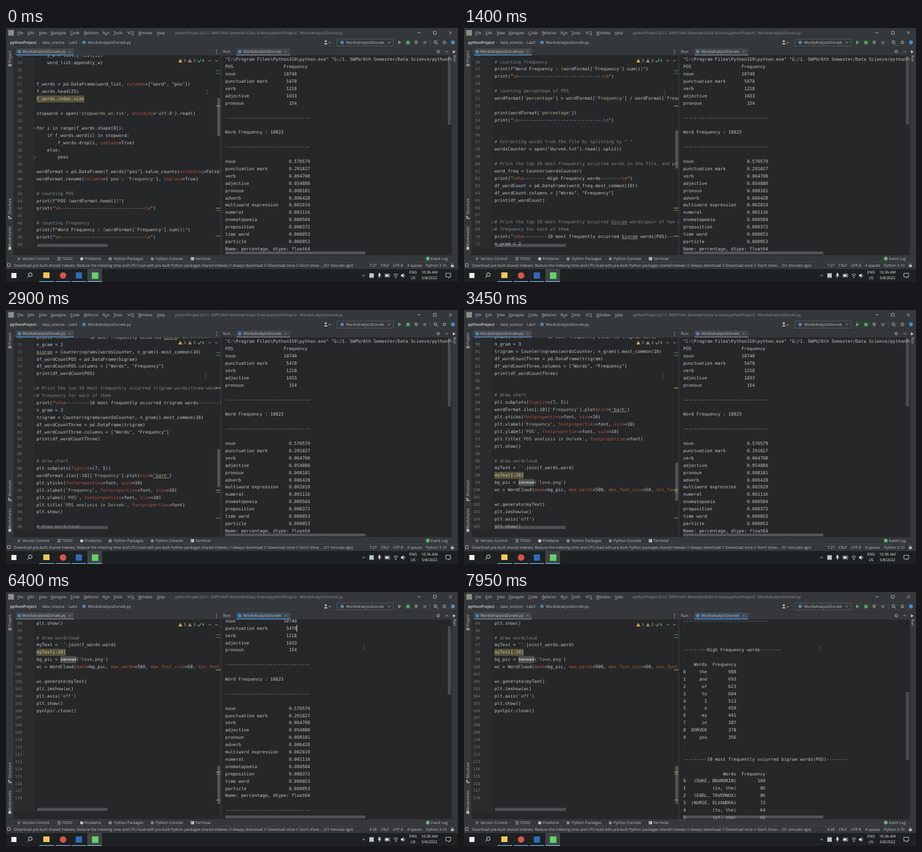
Animation of 800 by 450 pixels, one loop 8000 ms. Source, as an HTML page:

```html
<!DOCTYPE html>
<html lang="en">
<head>
<meta charset="utf-8">
<title>Code editor</title>
<style>
html, body { margin: 0; height: 100%; overflow: hidden; background: #252729; }
svg { display: block; width: 100vw; height: 100vh; }
text { font: 6.65px "Open Sans", "Noto Sans", sans-serif; white-space: pre; text-rendering: geometricPrecision; }
.mono text { font: 7.8px "DejaVu Sans Mono", "Noto Sans Mono", monospace; }
.mono .num { font-size: 7.1px; text-anchor: end; }
.bold { font-weight: 700; }
.esc { fill: #cc7832; }
.arg { fill: #b4533a; }
.str { fill: #aeb096; }
.typo { text-decoration: underline; text-decoration-color: #6f8f68; }
.old { text-decoration: line-through; }
.key { text-decoration: underline; }
</style>
</head>
<body>
<svg id="stage" viewBox="0 0 800 450" xml:space="preserve"></svg>
<script>
const ROW = 12.9, COL = 4.696, FIRST = 23, LAST = 118;
const EDITOR = '#252729', CHROME = '#35383a', INK = '#c2c4c6', DIM = '#85888a', GREEN = '#4fa55a';
const FOCUS = '#4a88c7', IDLE = '#747a80';
const FILE = 'WordsAnalysisDorvek';

const code = String.raw`    y_w = list(y_list[i])
    word_list.append(y_w)


f_words = pd.DataFrame(word_list, columns=["word", "pos"])
f_words.head(25)
f_words.index.size

stopword = open('stopwords_en.txt', encoding='utf-8').read()

for i in range(f_words.shape[0]):
    if f_words.word[i] in stopword:
        f_words.drop(i, inplace=True)
    else:
        pass

wordFormat = pd.DataFrame(f_words["pos"].value_counts(ascending=False))
wordFormat.rename(columns={'pos': 'Frequency'}, inplace=True)

# counting POS
print(f"POS {wordFormat.head()}")
print("\n--------------------------------\n")

# counting Frequency
print(f"Word Frequency : {wordFormat['Frequency'].sum()}")
print("\n--------------------------------\n")

# counting percentage of POS
wordFormat['percentage'] = wordFormat['Frequency'] / wordFormat['Frequency'].sum()

print(wordFormat['percentage'])
print("\n--------------------------------\n")


# Extracting words from the file by splitting by " "
wordsCounter = open("dorvek.txt").read().split()

# Print the top 10 most frequently occurred words in the file, and print
word_freq = Counter(wordsCounter)
print("\n\n---------High Frequency words--------\n")
df_wordCount = pd.DataFrame(word_freq.most_common(10))
df_wordCount.columns = ["Words", "Frequency"]
print(df_wordCount)


# Print the top 10 most frequently occurred bigram words(pair of two words)
# frequency for each of them
print("\n\n---------10 most frequently occurred bigram words(POS)--------\n")
n_gram = 2
bigram = Counter(ngrams(wordsCounter, n_gram)).most_common(10)
df_wordCountPOS = pd.DataFrame(bigram)
df_wordCountPOS.columns = ["Words", "Frequency"]
print(df_wordCountPOS)

# Print the top 10 most frequently occurred trigram words(three-word group)
# frequency for each of them.
print("\n\n---------10 most frequently occurred trigram words--------\n")
n_gram = 3
trigram = Counter(ngrams(wordsCounter, n_gram)).most_common(10)
df_wordCountThree = pd.DataFrame(trigram)
df_wordCountThree.columns = ["Words", "Frequency"]
print(df_wordCountThree)


# draw chart
plt.subplots(figsize=(7, 5))
wordFormat.iloc[:10]['Frequency'].plot(kind='barh')
plt.yticks(fontproperties=font, size=10)
plt.xlabel('Frequency', fontproperties=font, size=10)
plt.ylabel('POS', fontproperties=font, size=10)
plt.title('POS analysis in Dorvek', fontproperties=font)
plt.show()

# draw wordcloud
myText = ''.join(f_words.word)
myText[:20]
bg_pic = imread('love.png')
wc = WordCloud(mask=bg_pic, max_words=500, max_font_size=50, min_font_size=10)

wc.generate(myText)
plt.imshow(wc)
plt.axis('off')
plt.show()
pynlpir.close()`.split('\n');

// "label=value" pairs, label flush left and value flush right
const table = (list, end) => list.split(';').map(s => {
  const [a, b] = s.split('=');
  return a + b.padStart(end - a.length);
});
// numbered rows under a header, both columns flush right
const frame = (list, wide, end) => list.split(';').map((s, i) => {
  const [a, b] = s.split('=');
  return (i ? i - 1 + '' : ' ') + a.padStart(wide - 1) + b.padStart(end - wide);
});
const dashes = '-'.repeat(32);
const output = [
  '"C:\\Program Files\\Python310\\python.exe" "G:/1. SWPU/6th Semester/Data Science/pythonProject/Lab3"',
  'POS'.padEnd(22) + 'Frequency',
  ...table('noun=10740;punctuation mark= 5478;verb= 1218;adjective= 1033;pronoun=  154', 27),
  '', dashes, '', 'Word Frequency : 18823', '', dashes, '',
  ...table('noun=0.570579;punctuation mark=0.291027;verb=0.064708;adjective=0.054880;' +
    'pronoun=0.008181;adverb=0.006428;multiword expression=0.002019;numeral=0.001116;' +
    'onomatopoeia=0.000584;preposition=0.000372;time word=0.000053;particle=0.000053', 32),
  'Name: percentage, dtype: float64', '', dashes, '', '', '',
  '---------High Frequency words--------', '',
  ...frame('Words=Frequency;the=988;and=693;of=623;to=604;I=513;a=450;my=441;in=387;DORVEK=378;you=356', 9, 20),
  '', '', '---------10 most frequently occurred bigram words(POS)--------', '',
  ...frame('Words=Frequency;(DUKE, BRAMORIN)=109;(in, the)=86;(EARL, TAVERNOX)=86;' +
    '(NURSE, ELVANDRA)=73;(to, the)=64;(of, the)=60', 20, 31)
];

const text = (x, y, s, fill = INK, more = '') =>
  `<text x="${x}" y="${y + 2.4}" fill="${fill}" ${more}>${s}</text>`;
const box = (x, y, w, h, fill, more = '') =>
  `<rect x="${x}" y="${y}" width="${w}" height="${h}" fill="${fill}" ${more}/>`;
const dot = (x, y, r, fill) => `<circle cx="${x}" cy="${y}" r="${r}" fill="${fill}"/>`;
const ring = (x, y, r, c = INK) => `<circle cx="${x}" cy="${y}" r="${r}" fill="none" stroke="${c}"/>`;
const shape = (d, fill) => `<path d="${d}" fill="${fill}"/>`;
const line = (d, c = INK, w = .8) => `<path d="${d}" fill="none" stroke="${c}" stroke-width="${w}"/>`;
const cross = (x, y, r, c) => line(`M${x - r} ${y - r}l${2 * r} ${2 * r}m0 ${-2 * r}l${-2 * r} ${2 * r}`, c);
const arrow = (x, y, s, c) => line(`M${x - 2.2} ${y - s}l2.2 ${2 * s}l2.2 ${-2 * s}`, c);
const python = (x, y) => dot(x, y, 3, '#4d87b5');
const upright = (x, y, s, angle) =>
  text(0, 0, s, INK, `text-anchor="middle" transform="translate(${x} ${y}) rotate(${angle})"`);
const labels = (y, list) => list.map(([x, s, fill]) => text(x, y, s, fill)).join('');

function paint(s) {
  if (s.trim()[0] === '#') return s.replace(/bigram(?= )/, '<tspan class="typo">$&</tspan>');
  const tokens = s.includes('(f"') ? /\\n|[{}]/g : /\\n|'[^']*'|\w+(?==\S)|bigram(?= )|imread/g;
  return s.replace(tokens, m => {
    const kind = /[\\{}]/.test(m) ? 'esc' : m === 'imread' ? 'old' :
      /bigram|barh/.test(m) ? 'str typo' : m[0] === "'" ? 'str' : 'arg';
    return `<tspan class="${kind}">${m}</tspan>`;
  });
}

const lineY = n => 100 + (n - 27) * ROW;
const mark = (n, col, len, fill) => box(54 + col * COL, lineY(n) - 6.2, len * COL, 12.4, fill);
function editorText() {
  let s = mark(29, 0, 18, '#565334') + mark(98, 0, 11, '#565334') + mark(99, 9, 6, '#4c4f50');
  code.forEach((c, i) => {
    if (c) s += text(54, lineY(FIRST + i), paint(c), c[0] === '#' ? '#828587' : INK);
  });
  for (let n = FIRST; n <= LAST; n++) s += text(28.5, lineY(n), n, '#76797b', 'class="num"');
  for (const n of [33, 37, 68, 69, 77, 78]) s += `<g stroke-width=".6">${ring(51, lineY(n), 1.8, '#66696b')}</g>`;
  return s;
}

function topBars() {
  const menu = [[20, '_File'], [38, '_Edit'], [58, '_View'], [79, '_Navigate'], [114, '_Code'], [138, '_Refactor'],
    [171, 'R_un'], [190, '_Tools'], [215, 'VC_S'], [234, '_Window'], [267, '_Help']]
    .map(([x, s]) => [x, s.replace(/_(.)/, '<tspan class="key">$1</tspan>')]);
  return box(0, 0, 800, 48.5, CHROME) + box(0, 35, 800, .6, '#2a2c2e') +
    box(4, 3.5, 10, 10, '#8a8f86') + labels(8.5, menu) +
    text(447.5, 8.5, `pythonProject [G:\\1. SWPU\\6th Semester\\Data Science\\pythonProject] - ${FILE}.py`, '#929597', 'text-anchor="middle"') +
    line('M728 8.5h6') + line('M756.5 6h5v5h-5z') + cross(786.5, 8.5, 2.6) +
    text(7, 25.5, 'pythonProject', INK, 'class="bold"') +
    labels(25.5, [[57, '›', DIM], [64, 'data_science'], [105, '›', DIM], [111, 'Lab3'], [130, '›', DIM], [145, FILE + '.py']]) +
    python(138, 25.5) +
    dot(566, 23.5, 1.8, INK) + shape('M562.5 29q3.5-5 7 0z', INK) + arrow(573, 26, 1) +
    box(585.5, 19.5, 100, 12.5, CHROME, 'stroke="#5d6062" stroke-width=".8" rx="1.5"') +
    python(595, 25.5) + text(602, 25.5, FILE) + arrow(678, 25.5, 1.2) +
    shape('M694 22l6 3.5-6 3.5z', GREEN) + dot(711.5, 25.8, 3.2, GREEN) + line('M707.5 23l8 6m0-6l-8 6', GREEN) +
    shape('M723 22.5h6v3q-1 3-3 4q-2-1-3-4z', '#727577') + box(738.5, 23, 5.5, 5.5, '#626567') +
    box(750.5, 20, .6, 11, '#55585a') + ring(760, 25, 2.4) + line('M762 27l2.5 2.5') +
    ring(776, 25.5, 2.4) + dot(791, 25.5, 3.4, '#3f8fd0');
}

function tabs() {
  return box(18, 36, 102, 12, '#45494c') + python(23.5, 42) + text(29, 42, FILE + '.py') + cross(113, 42, 1.6, DIM) +
    [39, 42, 45].map(y => dot(372.5, y, .7, INK)).join('') +
    box(408, 36, 95, 12, '#42464a', 'id="runTab"') +
    text(384, 42, 'Run:') + python(413.5, 42) + text(420, 42, FILE) + cross(495, 42, 1.6, DIM) +
    ring(765, 41.8, 2.2) + line('M777.5 42h5') +
    box(18, 47, 102, 1.6, FOCUS, 'id="tabA"') + box(408, 47, 95, 1.6, IDLE, 'id="tabB"');
}

function sides() {
  return box(0, 36, 13, 366, CHROME) + box(13, 36, .6, 366, '#2a2c2e') + box(789, 36, 11, 366, CHROME) +
    upright(7, 51, 'Project', -90) + box(4, 63.5, 6, 4.5, DIM) +
    upright(7, 316, 'Structure', -90) + box(4, 333, 2.5, 2.5, INK) + box(7, 336, 2.5, 2.5, INK) + box(4, 336, 2.5, 2.5, DIM) +
    upright(7, 369, 'Bookmarks', -90) + shape('M4.5 387.5h4.5v6.5l-2.2-2-2.3 2z', INK) +
    shape('M791 39.5l5 2.8-5 2.8z', INK) + upright(794, 54, 'Run', 90);
}

function inspections() {
  const warn = (x, c) => shape(`M${x} 54.5l3.6 6.5h-7.2z`, c);
  const stripe = (y, c) => box(371.5, y, 8, 1.2, c);
  return box(303, 50, 74, 15, EDITOR) + warn(308.5, '#d9a63c') + text(314.5, 58, '3') + warn(325.5, '#8f866b') + text(331.5, 58, '3') +
    line('M339 58l2.5 2.5 4.5-5.5', GREEN, 1.3) + text(347, 58, '4') + arrow(360.5, 58, -1.2) + arrow(372.5, 58, 1.2) +
    stripe(75, '#4b7a4d') + stripe(80, '#4b7a4d') + stripe(137.5, '#b5a146') +
    stripe(318.5, '#b5a146') + stripe(322.5, '#4b7a4d') + stripe(368, '#857b50');
}

function bottomBars() {
  const notice = 'Download pre-built shared indexes: Reduce the indexing time and CPU load with pre-built Python packages shared indexes ' +
    "// Always download // Download once // Don't show ... (51 minutes ago)";
  return box(0, 402, 800, 25, CHROME) + box(0, 402, 800, .6, '#2a2c2e') + box(0, 414.5, 800, .6, '#484b4d') +
    labels(409, [[29, 'Version Control'], [99, 'TODO'], [139, 'Problems'], [191, 'Python Packages'], [265, 'Python Console'], [335, 'Terminal'], [752, 'Event Log']]) +
    line('M22 412v-6m0 4q3 0 3-3.5') + line('M91 406.5h6m-6 2.3h6m-6 2.3h6') + dot(134, 409, 2.8, INK) +
    box(181.5, 406.5, 5.5, 5, DIM) + dot(259, 409, 2.8, DIM) + box(327, 406, 6, 5.5, INK) + line('M328 407.5l1.5 1.3-1.5 1.3', '#333') +
    dot(746.5, 408.6, 3.5, GREEN) + text(745, 408.6, '1', '#fff') +
    line('M2.5 417.5h5v5h-5z') + text(14, 420.5, notice) + text(643, 420.5, '7:27', INK, 'id="pos"') +
    labels(420.5, [[663, 'CRLF'], [685, 'UTF-8'], [710, '4 spaces'], [743, 'Python 3.10']]) +
    box(787.5, 420, 5, 3.5, INK) + line('M788.5 420v-1.5q1.5-2 3 0v1.5');
}

function taskbar() {
  const open = [59, 88, 116, 144].map(x => box(x, 448.7, 26, 1.3, '#76b9ed')).join('');
  return box(0, 427, 800, 23, '#1d2121') + box(144, 427, 26, 23, '#3f4443') + open +
    box(9.5, 434, 9, 9, '#f0f0f0') + ring(43, 437, 3.2, '#eee') + line('M40.7 439.5l-3 3', '#eee', 1) +
    box(66, 433, 11, 10, '#f2c94f') + dot(101, 438.5, 5.8, '#dd5144') + box(123.5, 433, 11, 11, '#2b6cc4') + box(152, 433, 11.5, 11.5, '#62d36a') +
    arrow(633, 438.5, -1.3, '#eee') + box(643, 434.5, 8, 8, '#b9c4cb') + box(659.5, 434, 3, 5.5, '#eee', 'rx="1.5"') + line('M658 438q3 5 6 0M661 440.5v2.5', '#eee') +
    line('M671 436h8v5h-8z', '#eee') + box(672, 437, 5, 3, '#eee') +
    line('M686 437.5q4-4 8 0m-6.5 2q2.5-2.5 5 0', '#eee') + dot(690, 441.7, 1, '#eee') +
    shape('M699 437h2l2.5-2.5v8l-2.5-2.5h-2z', '#eee') + line('M705 436.5q1.5 2 0 4', '#eee') +
    [[720.5, 433, 'ENG'], [720.5, 443, 'US'], [749.5, 433, '10:36 AM'], [749.5, 443, '5/8/2022']]
      .map(([x, y, s]) => text(x, y, s, '#f2f2f2', 'text-anchor="middle"')).join('') +
    line('M778.5 434.5h8.5v6.5h-3v2l-2-2h-3.5z', '#eee');
}

const stage = document.getElementById('stage');
stage.innerHTML =
  '<clipPath id="left"><path d="M13 48h367v341H13z"/></clipPath><clipPath id="right"><path d="M381 48h408v354H381z"/></clipPath>' +
  box(0, 0, 800, 450, EDITOR) + box(13, 48, 37, 341, '#292b2d') +
  `<g class="mono" clip-path="url(#left)"><g id="editor">${editorText()}</g></g>` +
  box(55, 382.5, 125, 5.5, '#8a8d8f', 'opacity=".4"') + box(13, 389, 367, 13, EDITOR) +
  inspections() + box(374, 0, 5, 67, '#a6a8aa', 'id="thumbA" opacity=".35"') + box(379.8, 36, 1, 366, '#404345') +
  `<g class="mono" clip-path="url(#right)"><g id="console">${output.map((s, i) => text(388, 56 + i * ROW, s)).join('')}` +
  box(388 + 27 * COL - .5, 56 + 3 * ROW - 6, 1, 12, '#ddd', 'id="caret"') + '</g></g>' +
  box(388, 396, 248, 5, '#8a8d8f', 'opacity=".45"') + box(782, 0, 5.5, 121, '#a6a8aa', 'id="thumbB" opacity=".28"') +
  topBars() + tabs() + sides() + bottomBars() + taskbar() +
  `<g id="mouse">${line('M-1.5-3.5h3M0-3.5v7M-1.5 3.5h3', '#5c5f61', .6)}</g>`;

const get = id => document.getElementById(id);
const set = (id, name, value) => get(id).setAttribute(name, value);

// piecewise linear path through [time, value] points
function at(keys, t) {
  const i = keys.findIndex(k => k[0] > t);
  if (i < 0) return keys[keys.length - 1][1];
  if (i === 0) return keys[0][1];
  const [a, b] = [keys[i - 1], keys[i]];
  return a[1] + (b[1] - a[1]) * (t - a[0]) / (b[0] - a[0]);
}
const codeScroll = [[0, 0], [1400, 285], [2400, 500], [3450, 723], [4250, 870], [4450, 909]];
const runScroll = [[6260, 0], [7950, 366]];
const mouseX = [[0, 356], [1400, 355], [3450, 353], [5050, 353], [5350, 515], [5550, 515], [6000, 634], [6400, 634], [7950, 631]];
const mouseY = [[0, 114], [1400, 115], [2400, 117], [5050, 117], [5350, 95], [6000, 97], [6400, 97], [7950, 101]];

function draw(now) {
  const t = Math.floor(now % 8000 / 50) * 50;
  const a = at(codeScroll, t), b = at(runScroll, t), clicked = t >= 5500;
  set('editor', 'transform', `translate(0 ${-a})`);
  set('console', 'transform', `translate(0 ${-b})`);
  set('thumbA', 'y', 124 + a * .2025);
  set('thumbB', 'y', 50 + b * .347);
  set('mouse', 'transform', `translate(${at(mouseX, t)} ${at(mouseY, t)})`);
  set('tabA', 'fill', clicked ? IDLE : FOCUS);
  set('tabB', 'fill', clicked ? FOCUS : IDLE);
  set('runTab', 'fill', clicked ? '#3d4b5c' : '#42464a');
  set('caret', 'opacity', clicked && (t - 5500) % 1000 < 950 ? 1 : 0);
  get('pos').textContent = clicked ? '4:28' : '7:27';
  requestAnimationFrame(draw);
}
draw(0);
</script>
</body>
</html>
```
